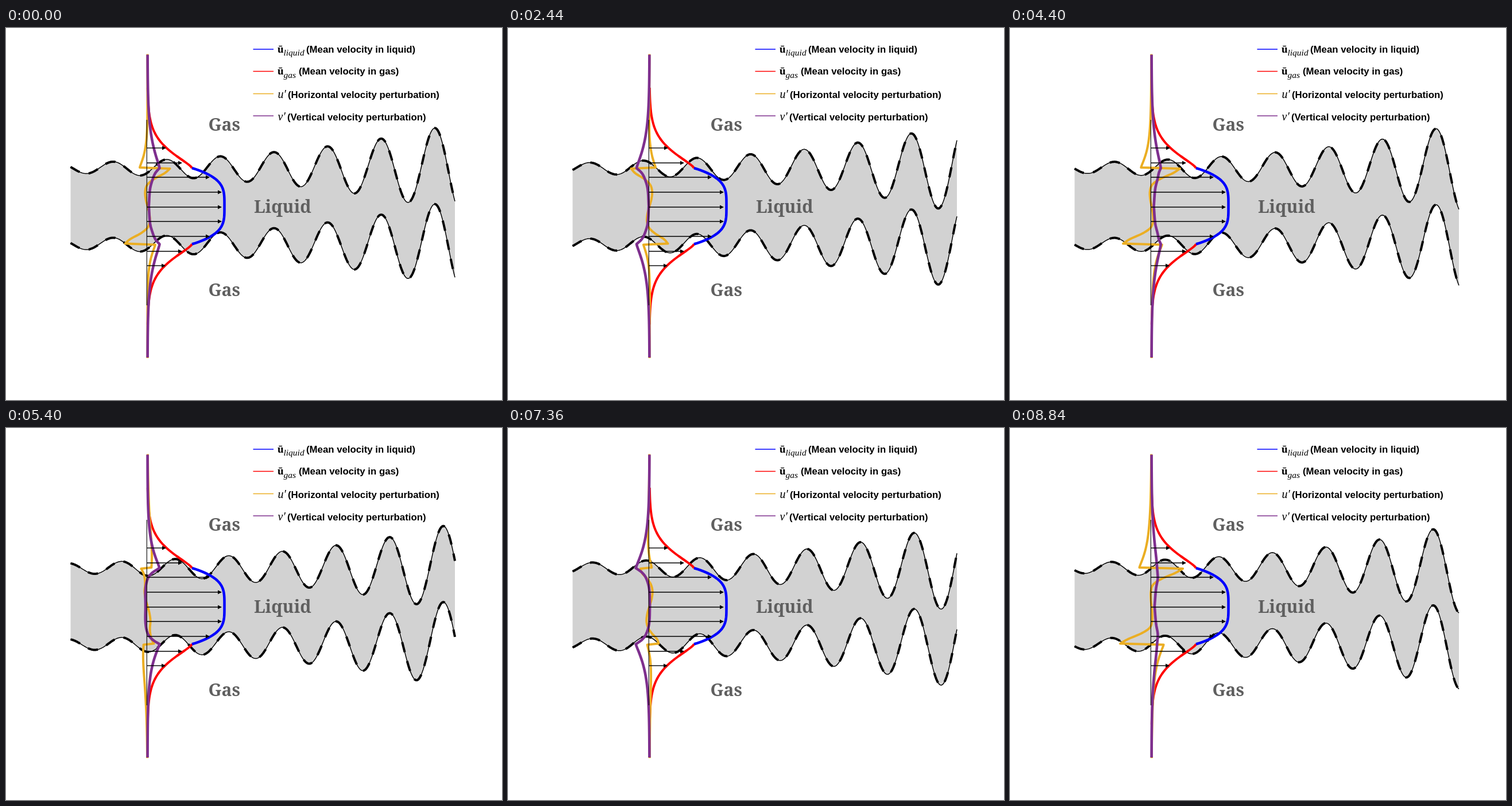
Animation, 864 px wide and 648 px high, one loop 9.32 s. Source, as an HTML page with a canvas:

```html
<!DOCTYPE html>
<html lang="en">
<head>
<meta charset="utf-8">
<title>Liquid sheet instability</title>
<style>
html, body { margin: 0; width: 100%; height: 100%; overflow: hidden; background: #fff; }
canvas { display: block; }
</style>
</head>
<body>
<canvas id="stage" width="864" height="648"></canvas>
<script>
const ctx = document.getElementById('stage').getContext('2d');
const LOOP = 9320;
const STEPS = [0, 520, 1000, 1480, 1960, 2440, 2960, 3440, 3920, 4400, 4920,
  5400, 5880, 6360, 6880, 7360, 7840, 8320, 8840];
const LEFT = 112.5, RIGHT = 782;
const TOP = 244, BOTTOM = 376.5, MID = (TOP + BOTTOM) / 2, HALF = BOTTOM - MID;
const BASE = 246.5;
const WAVELENGTH = 93.4;
const ORANGE = '#ebae23', PURPLE = '#7e2f8e';

// Perturbations in the liquid: [depth below interface, cosine part, sine part]
const U_LIQUID = [[0, 39, -38.8], [8, 30, -28], [18, 12, -13.5], [28, 0, -5],
  [40, -4, -3.5], [54, -3, -2], [HALF, 0, 0]];
const V_LIQUID = [[0, 21, 11.2], [8, 14, 1], [18, 9.5, -5.5], [36, 4.5, -7], [HALF, 2.3, -5.7]];

const decay = (d, scale, power = 1.2) => Math.exp(-Math.pow(d / scale, power));

// Smooth interpolation of one table column
function sample(table, d, col) {
  let i = 0;
  while (i < table.length - 2 && d > table[i + 1][0]) i++;
  const slope = k => {
    const a = table[Math.max(k - 1, 0)], b = table[Math.min(k + 1, table.length - 1)];
    return (b[col] - a[col]) / (b[0] - a[0]);
  };
  const [p, q] = [table[i], table[i + 1]];
  const h = q[0] - p[0], t = (d - p[0]) / h, s = 1 - t;
  return s * s * (1 + 2 * t) * p[col] + t * t * (1 + 2 * s) * q[col]
    + h * t * s * (s * slope(i) - t * slope(i + 1));
}

function stroke(points, color, width, dash = []) {
  ctx.beginPath();
  points.forEach(([x, y]) => ctx.lineTo(x, y));
  ctx.strokeStyle = color;
  ctx.lineWidth = width;
  ctx.lineJoin = 'round';
  ctx.setLineDash(dash);
  ctx.stroke();
  ctx.setLineDash([]);
}

// Evenly spaced samples in either direction
function range(from, to, step, fn) {
  const n = Math.ceil(Math.abs(to - from) / step);
  return Array.from({ length: n + 1 }, (_, i) => fn(from + (to - from) * i / n));
}

function drawSheet(phase) {
  const wave = mid => range(LEFT, RIGHT, 1.5, x => [x,
    mid - 9.54 * Math.exp(0.00328 * (x - 140))
      * Math.cos(2 * Math.PI * (x - 746.3) / WAVELENGTH - phase)]);
  const upper = wave(TOP), lower = wave(BOTTOM);
  ctx.beginPath();
  [...upper, ...lower.slice().reverse()].forEach(([x, y]) => ctx.lineTo(x, y));
  ctx.fillStyle = '#d2d2d2';
  ctx.fill();
  for (const line of [upper, lower]) {
    stroke(line, '#000', 1.5);
    stroke(line, '#000', 4, [18, 16]);
  }
}

function drawMeanFlow() {
  const gas = d => BASE + 77.5 * decay(d, 39.5, 1.35);
  stroke(range(0, 140, 2, d => [gas(d), TOP - d]), '#f00', 4);
  stroke(range(0, 140, 2, d => [gas(d), BOTTOM + d]), '#f00', 4);
  stroke(range(TOP, BOTTOM, 2, y =>
    [380.5 - 56.5 * Math.pow(Math.abs(y - MID) / HALF, 3.8), y]), '#00f', 4.5);
}

// Mirrors the upper half about the centre line; sign is 1 or -1
function drawPerturbation(gas, liquid, sign, gap, color, width) {
  const half = [
    ...range(TOP - 46.5, 0, 2, d => [gas(d), TOP - gap - d]),
    ...range(0, HALF, 2, d => [liquid(d), TOP + gap + d * (1 - gap / HALF)])
  ];
  const mirrored = half.slice().reverse().map(([x, y]) => [sign * x, 2 * MID - y]);
  stroke([...half, ...mirrored].map(([x, y]) => [BASE + x, y]), color, width);
}

function drawPerturbations(phase) {
  const c = Math.cos(phase), s = Math.sin(phase);
  const inLiquid = table => d => c * sample(table, d, 1) + s * sample(table, d, 2);
  const uGas = d => -13.5 * c * decay(d, 28) + 17 * s * decay(d, 70);
  const vGas = d => 21 * c * decay(d, 50) + 11.2 * s * decay(d, 32);
  drawPerturbation(uGas, inLiquid(U_LIQUID), -1, 0.9, ORANGE, 4);
  drawPerturbation(vGas, inLiquid(V_LIQUID), 1, 0, PURPLE, 4.6);
}

function drawArrows() {
  const x0 = 245.3;
  stroke([[x0, 160], [x0, 483]], '#000', 1.1);
  [279, 307, 355, 376, 376, 376, 355, 307, 278].forEach((tip, i) => {
    const y = Math.round(209 + 25.65 * i);
    stroke([[x0, y], [tip - 5, y]], '#000', 1.4);
    ctx.beginPath();
    ctx.moveTo(tip, y);
    ctx.lineTo(tip - 7, y - 3.5);
    ctx.lineTo(tip - 7, y + 3.5);
    ctx.fillStyle = '#000';
    ctx.fill();
  });
}

function text(str, x, y, font, color = '#000') {
  ctx.font = font;
  ctx.fillStyle = color;
  ctx.fillText(str, x, y);
}

function drawLabels() {
  const big = 'bold 30px "Noto Serif", serif', grey = '#5f5f5f';
  text('Gas', 352.5, 179, big, grey);
  text('Liquid', 432, 322, big, grey);
  text('Gas', 352.5, 466.5, big, grey);

  const serif = '"Liberation Serif", serif';
  const rows = [
    ['#00f', 37, 'liquid', 523, 42.5, '(Mean velocity in liquid)'],
    ['#f00', 75.5, 'gas', 510, 81, '(Mean velocity in gas)'],
    [ORANGE, 114.5, 'u′', 491, 122, '(Horizontal velocity perturbation)'],
    [PURPLE, 153, 'v′', 490, 160.5, '(Vertical velocity perturbation)']
  ];
  rows.forEach(([color, lineY, symbol, x, y, label], i) => {
    stroke([[430.5, lineY], [466, lineY]], color, 1.7);
    if (i < 2) {
      text('ū', 473, y, `bold 19px ${serif}`);
      text(symbol, 483.5, y + 5.5, `italic 15.5px ${serif}`);
    } else {
      text(symbol, 473.5, y, `italic 20px ${serif}`);
    }
    text(label, x, y, 'bold 16.8px "Liberation Sans", Arial, sans-serif');
  });
}

function draw(time) {
  const t = time % LOOP;
  const step = STEPS.filter(start => start <= t).length - 1;
  const phase = 4 * Math.PI * step / STEPS.length;
  ctx.fillStyle = '#fff';
  ctx.fillRect(0, 0, 864, 648);
  drawSheet(phase);
  drawMeanFlow();
  drawPerturbations(phase);
  drawArrows();
  drawLabels();
}

const start = performance.now();
function loop() {
  draw(performance.now() - start);
  requestAnimationFrame(loop);
}
loop();
</script>
</body>
</html>
```
